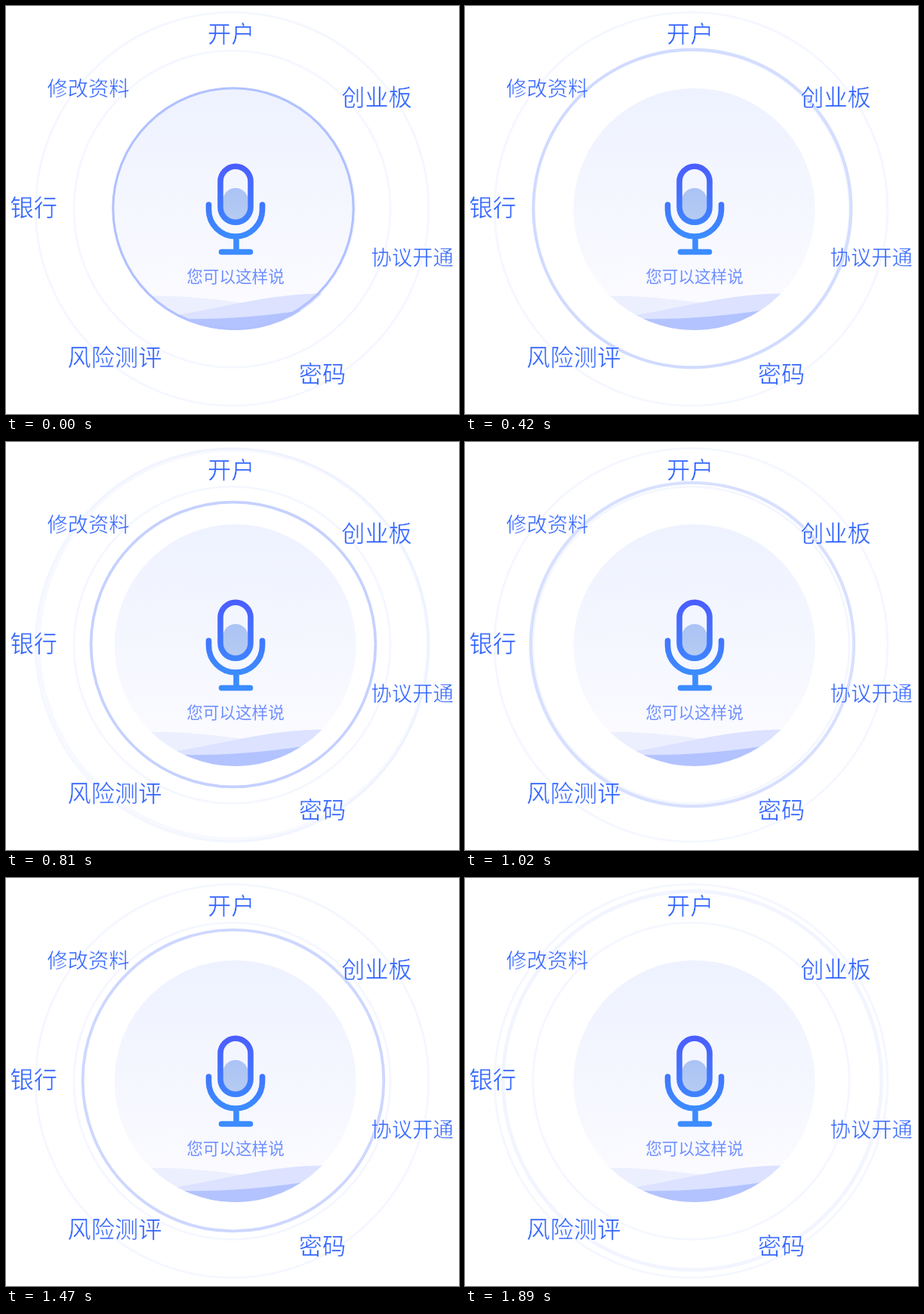
An HTML page with a canvas that plays this animation: 600 by 540 pixels, repeating every 2.21 s.

```html
<!DOCTYPE html>
<html lang="zh-CN">
<head>
<meta charset="utf-8">
<style>
  html, body { margin: 0; width: 600px; height: 540px; overflow: hidden; background: #fff; }
  canvas, svg { position: absolute; left: 0; top: 0; display: block; }
  /* the thin white stroke slims the glyphs */
  text {
    font-family: "Noto Sans CJK SC", "Noto Sans CJK", "Noto Sans", sans-serif;
    font-weight: 300; font-size: 31.2px; fill: #3366ff; text-anchor: middle;
    stroke: #fff; stroke-width: 0.5px;
  }
  .small { font-size: 27.3px; }
  .hint { font-size: 21.6px; font-weight: 400; fill: #7090ff; stroke: none; }
</style>
</head>
<body>
<canvas id="stage" width="600" height="540"></canvas>
<svg width="600" height="540">
  <text x="298.2" y="48.3">开户</text>
  <text x="491" y="131.6">创业板</text>
  <text x="109" y="118.6" class="small">修改资料</text>
  <text x="36.8" y="277.6">银行</text>
  <text x="538.2" y="342.6" class="small">协议开通</text>
  <text x="144" y="476.4">风险测评</text>
  <text x="419" y="498.4">密码</text>
  <text x="304" y="365.8" class="hint">您可以这样说</text>
</svg>
<script>
const ctx = document.getElementById('stage').getContext('2d');
const LOOP = 2210, STEP = 30, LAST = 1890;
const GAP = 570, LIFE = 900, GROWTH = 0.000765;

function ring(x, y, r, width, color) {
  ctx.beginPath();
  ctx.arc(x, y, r, 0, Math.PI * 2);
  ctx.lineWidth = width;
  ctx.strokeStyle = color;
  ctx.stroke();
}

function fade(y0, y1, from, to) {
  const g = ctx.createLinearGradient(0, y0, 0, y1);
  g.addColorStop(0, from);
  g.addColorStop(1, to);
  return g;
}

// Fills everything below a cubic curve
function wave(color, x, y, ...curve) {
  ctx.beginPath();
  ctx.moveTo(x, y);
  ctx.bezierCurveTo(...curve);
  ctx.lineTo(curve[4], 440);
  ctx.lineTo(x, 440);
  ctx.fillStyle = color;
  ctx.fill();
}

function disc() {
  ctx.save();
  ctx.beginPath();
  ctx.arc(303.7, 269, 160, 0, Math.PI * 2);
  ctx.fillStyle = fade(109, 400, '#eef2ff', '#fbfbff');
  ctx.fill();
  ctx.clip();
  wave('#eceffe', 185, 384, 235, 383, 275, 388, 330, 395);
  wave('#dce2ff', 224, 409.5, 285, 400, 345, 381, 422, 380.5);
  wave('#b3c3ff', 230, 414, 285, 415, 340, 411, 395, 402.5);
  ctx.restore();
}

function mic() {
  ctx.beginPath();
  ctx.roundRect(287.5, 241, 33, 42, 16);
  ctx.fillStyle = fade(241, 283, '#abc3f5', '#b5cbf2');
  ctx.fill();

  ctx.strokeStyle = fade(208, 306, '#4b5cff', '#3b8cff');
  ctx.lineCap = 'round';
  ctx.beginPath();
  ctx.roundRect(284, 212.3, 40, 74, 20);
  ctx.lineWidth = 7.6;
  ctx.stroke();

  ctx.beginPath();
  ctx.moveTo(268.5, 263);
  ctx.lineTo(268.5, 269.5);
  ctx.arc(304, 269.5, 35.5, Math.PI, 0, true);
  ctx.lineTo(339.5, 263);
  ctx.moveTo(305, 306);
  ctx.lineTo(305, 325);
  ctx.moveTo(285.5, 325.5);
  ctx.lineTo(323.5, 325.5);
  ctx.stroke();
}

function ripple(age) {
  if (age < 0 || age >= LIFE) return;
  const scale = 1 + GROWTH * age;
  ctx.globalAlpha = 1 - age / LIFE;
  ring(301, 268, 159.2 * scale, 3.1 * scale, '#b1c1ff');
  ctx.globalAlpha = 1;
}

function draw(now) {
  const t = Math.min(Math.floor((now % LOOP) / STEP) * STEP, LAST);
  ctx.clearRect(0, 0, 600, 540);
  ring(299.5, 268.7, 260.3, 2.8, '#f4f7ff');
  ring(299.5, 268.7, 209.5, 2.8, '#f4f7ff');
  disc();
  for (let i = 0; i < 3; i++) ripple(t - i * GAP);
  mic();
}

const start = performance.now();
function tick() {
  draw(performance.now() - start);
  requestAnimationFrame(tick);
}
tick();
</script>
</body>
</html>
```
